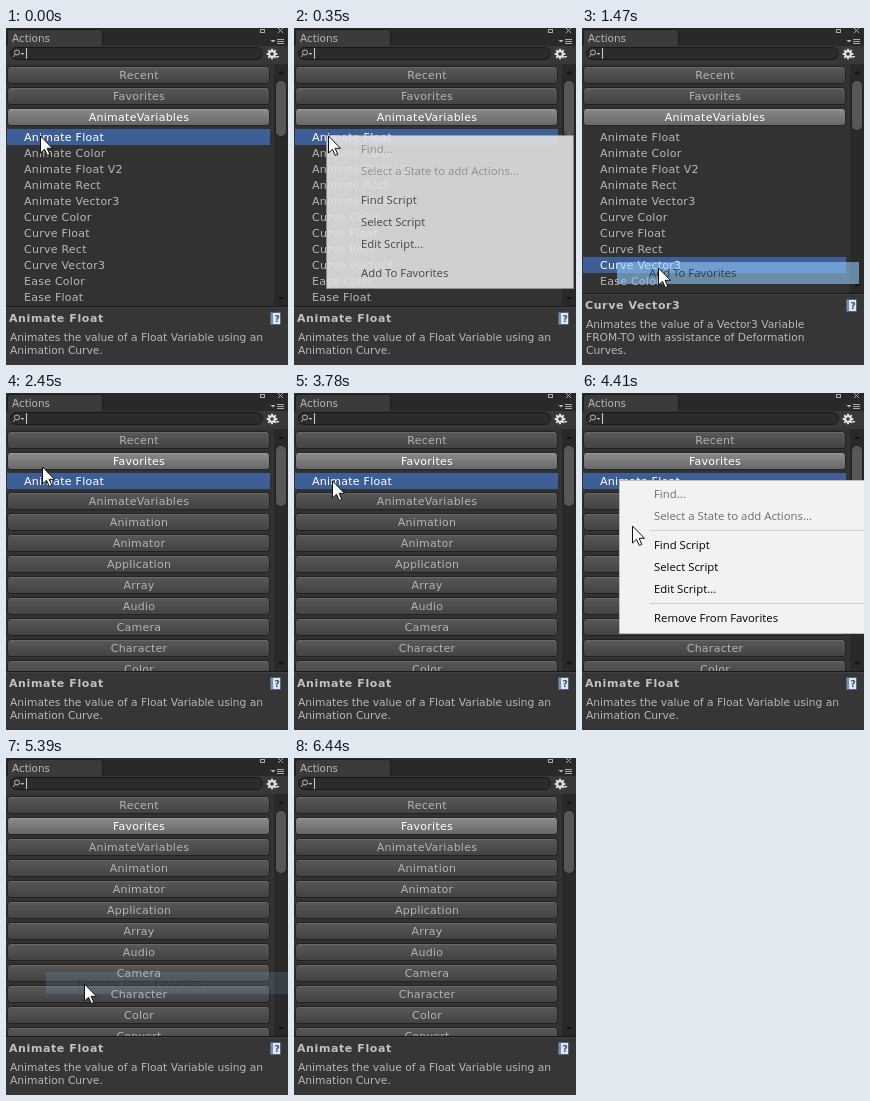
These frames come from a looping animation (282 by 337 pixels, 6.86 s). An HTML page with a canvas:

```html
<!DOCTYPE html>
<html lang="en">
<head>
<meta charset="utf-8">
<title>Actions panel</title>
<style>
html, body { margin: 0; width: 100%; height: 100%; overflow: hidden; background: #333; }
canvas { display: block; width: 282px; height: 337px; }
</style>
</head>
<body>
<canvas id="stage" width="282" height="337"></canvas>
<script>
const ctx = document.getElementById('stage').getContext('2d');
const LOOP = 6860, TICK = 70;
const UI = '"DejaVu Sans", sans-serif';
const MENU = '"Open Sans", sans-serif';

const actions = ['Animate Float', 'Animate Color', 'Animate Float V2', 'Animate Rect', 'Animate Vector3',
  'Curve Color', 'Curve Float', 'Curve Rect', 'Curve Vector3', 'Ease Color', 'Ease Float'];
const categories = ['AnimateVariables', 'Animation', 'Animator', 'Application', 'Array', 'Audio',
  'Camera', 'Character', 'Color', 'Convert'];
const descriptions = {
  'Animate Float': ['Animates the value of a Float Variable using an', 'Animation Curve.'],
  'Curve Vector3': ['Animates the value of a Vector3 Variable', 'FROM-TO with assistance of Deformation', 'Curves.']
};

// Item centres and separators, measured from the top of a menu
const menuItems = [[14, 'Find...', true], [36, 'Select a State to add Actions...', true],
  [65, 'Find Script'], [87, 'Select Script'], [109, 'Edit Script...'], [138]];
const separators = [50, 123];
const menus = [
  { x: 32, y: 107, open: 280, fadeIn: 210, close: 1470, last: 'Add To Favorites' },
  { x: 37, y: 87, open: 4060, fadeIn: 140, close: 5180, last: 'Remove From Favorites' }
];
const MENU_WIDTH = 248, MENU_HEIGHT = 154, FADE_OUT = 280;

// Cursor moves: start, end, x, y, ease-out power
const moves = [
  [630, 1050, 76, 240, 2.2],
  [1610, 2030, 36, 74, 2],
  [3010, 3220, 36, 87, 1.5],
  [3500, 3640, 39, 91, 1],
  [3640, 3780, 38, 88, 1],
  [3990, 4060, 37, 87, 1],
  [4340, 4760, 77, 227, 2.2],
  [4830, 4900, 78, 226, 1],
  [5950, 6020, 77, 226, 1],
  [6090, 6440, 231, 351, 1]
];

function rect(x, y, w, h, fill) {
  ctx.fillStyle = fill;
  ctx.fillRect(x, y, w, h);
}

function roundBox(x, y, w, h, r, fill, stroke) {
  ctx.beginPath();
  ctx.roundRect(x, y, w, h, r);
  ctx.fillStyle = fill;
  ctx.fill();
  if (stroke) {
    ctx.strokeStyle = stroke;
    ctx.lineWidth = 1;
    ctx.stroke();
  }
}

function polygon(points, fill, stroke) {
  ctx.beginPath();
  points.forEach(([x, y]) => ctx.lineTo(x, y));
  ctx.closePath();
  ctx.fillStyle = fill;
  ctx.fill();
  if (stroke) {
    ctx.strokeStyle = stroke;
    ctx.lineWidth = 1;
    ctx.stroke();
  }
}

function arrow(x, y, size, direction, fill) {
  polygon([[x - size, y], [x + size, y], [x, y + direction * size]], fill);
}

function label(text, x, y, font, color, spacing = 0, align = 'left') {
  ctx.font = font;
  ctx.letterSpacing = spacing + 'px';
  ctx.textAlign = align;
  ctx.fillStyle = color;
  ctx.fillText(text, x, y);
}

function gradient(top, bottom, from, to) {
  const g = ctx.createLinearGradient(0, top, 0, bottom);
  g.addColorStop(0, from);
  g.addColorStop(1, to);
  return g;
}

function button(text, y, active) {
  const fill = active ? gradient(y - 8, y + 8, '#8a8a8a', '#686868') : gradient(y - 8, y + 8, '#585858', '#434343');
  roundBox(1.5, y - 8.5, 262, 17, 3, fill, '#222');
  rect(4, y - 8, 257, 1, active ? '#9c9c9c' : '#686868');
  label(text, 133, y + 4, '11px ' + UI, active ? '#fff' : '#b4b4b4', 0.25, 'center');
}

function row(text, y, selected) {
  if (selected) rect(1, y - 8, 263, 16, '#3e5f96');
  label(text, 18, y + 4, '11px ' + UI, selected ? '#fff' : '#b8b8b8', 0.25);
}

function drawHeader() {
  rect(0, 0, 282, 19, '#292929');
  roundBox(1.5, 1.5, 95, 22, [3, 3, 0, 0], '#3b3b3b', '#1d1d1d');
  rect(0, 18, 282, 19, '#383838');
  label('Actions', 6, 14, '10.4px ' + UI, '#b8b8b8');

  ctx.strokeStyle = '#aaa';
  ctx.lineWidth = 1;
  ctx.strokeRect(254.5, 1.5, 4, 3);
  ctx.beginPath();
  ctx.moveTo(272, 0); ctx.lineTo(277, 5);
  ctx.moveTo(277, 0); ctx.lineTo(272, 5);
  ctx.stroke();
  arrow(267, 12, 2.5, 1, '#b8b8b8');
  [11, 13, 15].forEach(y => rect(271, y, 7, 1, '#aaa'));

  roundBox(4.5, 19.5, 252, 12, 6, '#2b2b2b', '#191919');
  ctx.strokeStyle = '#bbb';
  ctx.beginPath();
  ctx.arc(11, 24.5, 2.5, 0, 7);
  ctx.moveTo(9, 26.5); ctx.lineTo(7, 29);
  ctx.stroke();
  arrow(16.5, 25, 2, 1, '#bbb');
  rect(20, 20, 1, 11, '#ccc');

  ctx.strokeStyle = '#e4e4e4';
  ctx.lineWidth = 2;
  ctx.beginPath();
  ctx.arc(266, 26, 2.8, 0, 7);
  for (let i = 0; i < 8; i++) {
    const c = Math.cos(i * Math.PI / 4), s = Math.sin(i * Math.PI / 4);
    ctx.moveTo(266 + 3 * c, 26 + 3 * s);
    ctx.lineTo(266 + 5.3 * c, 26 + 5.3 * s);
  }
  ctx.stroke();
  arrow(271.5, 28, 2, 1, '#e4e4e4');
}

function drawList(view, selected, bottom) {
  ctx.save();
  ctx.beginPath();
  ctx.rect(0, 36, 282, bottom - 36);
  ctx.clip();
  rect(0, 36, 282, bottom - 36, '#323232');
  button('Recent', 47, false);
  button('Favorites', 68, view !== 'variables');
  if (view === 'variables') {
    button(categories[0], 89, true);
    actions.forEach((name, i) => row(name, 109 + 16 * i, name === selected));
  } else {
    if (view === 'favorites') row(selected, 88, true);
    const top = view === 'favorites' ? 108 : 89;
    categories.forEach((name, i) => button(name, top + 21 * i, false));
  }
  rect(268, 36, 14, bottom - 36, '#292929');
  arrow(275, 46, 3, -1, '#111');
  arrow(275, bottom - 9, 3, 1, '#111');
  const thumbEnd = view === 'variables' ? bottom - 170 : view === 'favorites' ? 113 : 115;
  roundBox(269.5, 52.5, 11, Math.max(50, thumbEnd - 52), 5, '#575757', '#1e1e1e');
  ctx.restore();
}

function drawDescription(title, top) {
  rect(0, top, 282, 337 - top, '#363636');
  rect(0, top, 282, 1, '#191919');
  rect(0, top + 1, 282, 1, '#414141');
  label(title, 3, top + 16, 'bold 11px ' + UI, '#c2c2c2', 0.6);
  descriptions[title].forEach((line, i) =>
    label(line, 4, top + 35 + 13 * i, '10.7px ' + UI, '#b8b8b8'));
  roundBox(264.5, top + 6.5, 10, 12, 1, '#dfe5ec', '#4d6684');
  rect(265, top + 7, 2, 11, '#7390b3');
  label('?', 271, top + 16, 'bold 9px ' + UI, '#31537c', 0, 'center');
}

function menuLabel(menu, [offset, text, disabled]) {
  label(text || menu.last, menu.x + 35, menu.y + offset + 4, '11.35px ' + MENU, disabled ? '#6d6d6d' : '#000');
}

function highlight(menu, offset) {
  rect(menu.x + 3, menu.y + offset - 11, MENU_WIDTH - 6, 22, '#91c9f7');
}

function drawMenu(menu, t, cursorY) {
  if (t < menu.open || t >= menu.close + FADE_OUT) return;
  ctx.save();
  if (t >= menu.close) {
    // The chosen item lingers after the menu has closed
    const item = menuItems[menuItems.length - 1];
    ctx.globalAlpha = 0.6 * (1 - (t - menu.close) / FADE_OUT);
    highlight(menu, item[0]);
    menuLabel(menu, item);
  } else {
    ctx.globalAlpha = Math.min(1, (t - menu.open + TICK) / menu.fadeIn);
    rect(menu.x, menu.y, MENU_WIDTH, MENU_HEIGHT, '#bcbcbc');
    rect(menu.x + 1, menu.y + 1, MENU_WIDTH - 2, MENU_HEIGHT - 2, '#f2f2f2');
    separators.forEach(y => rect(menu.x + 31, menu.y + y, MENU_WIDTH - 34, 1, '#cfcfcf'));
    for (const item of menuItems) {
      const hovered = !item[2] && Math.abs(cursorY - menu.y - item[0]) < 11;
      if (hovered) highlight(menu, item[0]);
      menuLabel(menu, item);
    }
  }
  ctx.restore();
}

function cursorAt(t) {
  let x = 34, y = 108;
  for (const [start, end, toX, toY, power] of moves) {
    if (t <= start) break;
    const p = 1 - (1 - Math.min(1, (t - start) / (end - start))) ** power;
    x += (toX - x) * p;
    y += (toY - y) * p;
  }
  return [Math.round(x), Math.round(y)];
}

function drawCursor(x, y) {
  const shape = [[0, 0], [0, 17], [4, 13.3], [6.8, 19.5], [9.3, 18.4], [6.6, 12.3], [12, 12.3]];
  polygon(shape.map(([dx, dy]) => [x + dx + 0.5, y + dy]), '#fff', '#111');
}

function draw(t) {
  const view = t < 2380 ? 'variables' : t < 5180 ? 'favorites' : 'collapsed';
  const selected = t >= 1470 && t < 2380 ? 'Curve Vector3' : 'Animate Float';
  const panelTop = 317 - 13 * descriptions[selected].length - 13 + (selected === 'Animate Float' ? 0 : 0);
  const [x, y] = cursorAt(t);
  drawHeader();
  drawList(view, selected, panelTop);
  drawDescription(selected, panelTop);
  menus.forEach(menu => drawMenu(menu, t, y));
  if (t < 6440) drawCursor(x, y);
}

function frame() {
  draw(Math.floor(performance.now() % LOOP / TICK) * TICK);
  requestAnimationFrame(frame);
}
frame();
</script>
</body>
</html>
```
